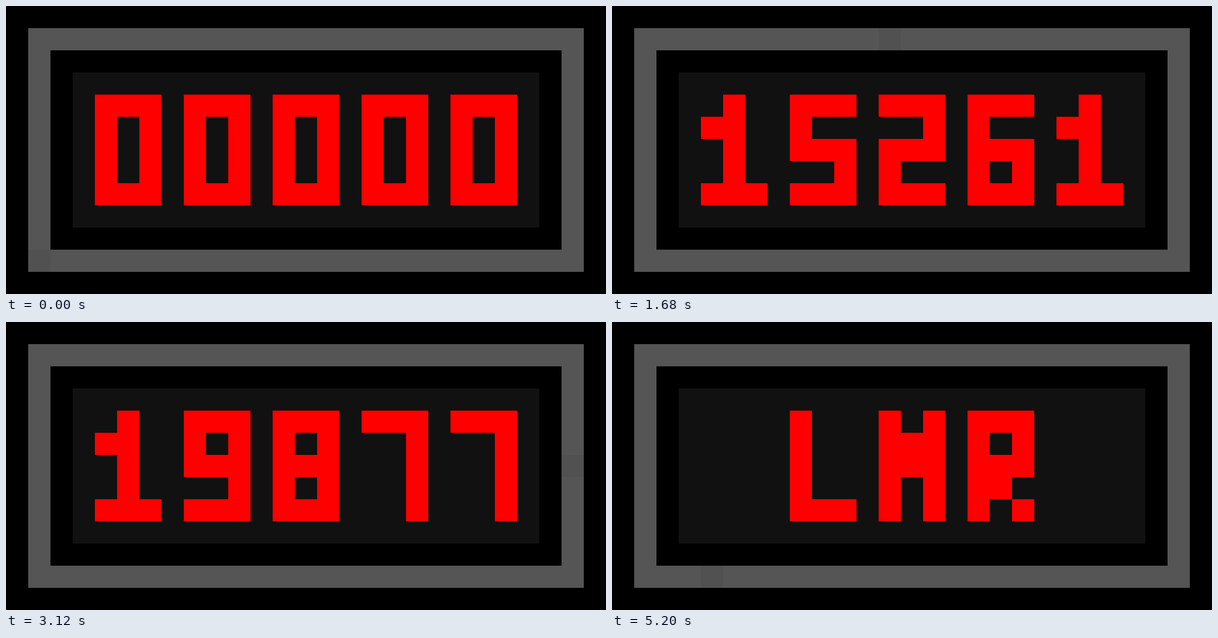
These frames come from a looping animation (864 by 416 pixels, 5.28 s). An HTML page with a canvas:

```html
<!DOCTYPE html>
<html lang="en">
<head>
<meta charset="utf-8">
<title>Counter display</title>
<style>
  html, body { margin: 0; width: 100%; height: 100%; overflow: hidden; background: #000; }
  canvas { display: block; }
</style>
</head>
<body>
<canvas id="stage" width="864" height="416"></canvas>
<script>
const ctx = document.getElementById('stage').getContext('2d');
const CELL = 32, TICK = 80, TICKS = 66;

// 3x5 glyphs, one octal digit per row
const GLYPHS = {
  0: '75557', 1: '26227', 2: '71747', 3: '71717', 4: '55711',
  5: '74717', 6: '74757', 7: '71111', 8: '75757', 9: '75717',
  L: '44447', M: '57755', R: '75765', ' ': '00000'
};

const RUNS = [
  { start: 6, from: '00000', to: '04150' },
  { start: 20, from: '04150', to: '04324' },
  { start: 34, from: '04324', to: '10107' }
];
const TAPE = ' LMR 967 10107';
const SHIFTS = [47, 49, 51, 53, 55, 59, 61, 63, 65];

// A pair of ones sweeps from left to right
function sweep(tick) {
  return [0, 1, 2, 3, 4].map(i => (i === tick - 1 || i === tick - 2 ? 1 : 0)).join('');
}

// Every wheel turns forward one digit per tick until it reaches its target
function spin(run, steps) {
  return [...run.from].map((c, i) => {
    const turn = (run.to[i] - c + 9) % 10 + 1;
    return (+c + Math.min(steps, turn)) % 10;
  }).join('');
}

function textAt(tick) {
  if (tick < 7) return sweep(tick);
  if (tick >= SHIFTS[0]) {
    const pos = SHIFTS.filter(s => s > tick).length;
    return TAPE.slice(pos, pos + 5);
  }
  const run = RUNS.filter(r => r.start < tick).pop();
  return spin(run, tick - run.start);
}

// Clockwise walk around the frame, from the bottom left corner
function frameCell(n) {
  if (n < 10) return [1, 11 - n];
  if (n < 34) return [n - 9, 1];
  if (n < 44) return [25, n - 33];
  return [69 - n, 11];
}

function box(color, x, y, w, h) {
  ctx.fillStyle = color;
  ctx.fillRect(x * CELL, y * CELL, w * CELL, h * CELL);
}

function drawGlyph(char, left) {
  [...GLYPHS[char]].forEach((row, y) => {
    for (let x = 0; x < 3; x++) {
      if (row & (4 >> x)) box('#f00', left + x, 4 + y, 1, 1);
    }
  });
}

function draw(tick) {
  box('#000', 0, 0, 27, 13);
  box('#555', 1, 1, 25, 11);
  box('#515151', ...frameCell(tick), 1, 1);
  box('#000', 2, 2, 23, 9);
  box('#111', 3, 3, 21, 7);
  [...textAt(tick)].forEach((c, i) => drawGlyph(c, 4 + 4 * i));
}

function loop() {
  draw(Math.floor(performance.now() / TICK) % TICKS);
  requestAnimationFrame(loop);
}
loop();
</script>
</body>
</html>
```
